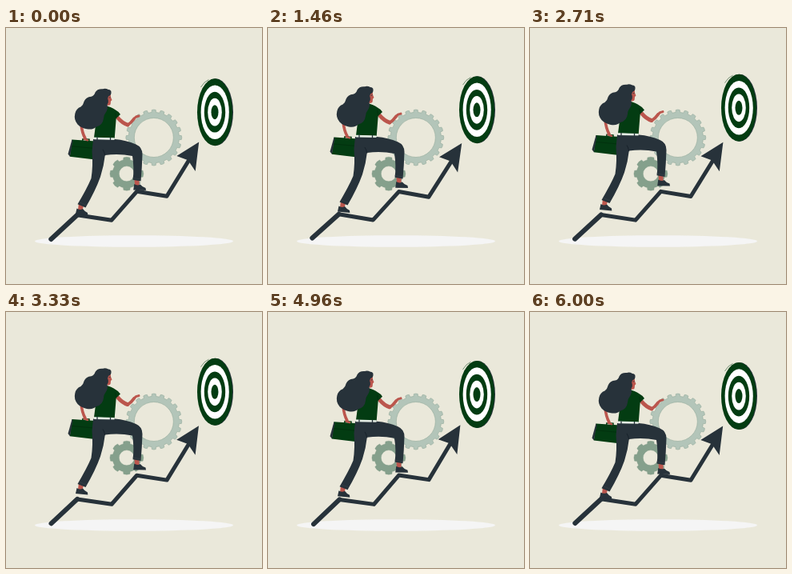
Recreate the animation shown at these times as an HTML page. Size 320 px wide and 320 px high, loop 6040 ms.

```html
<!DOCTYPE html>
<html lang="en">
<head>
<meta charset="utf-8">
<title>Climbing to the target</title>
<style>
  html, body { margin: 0; width: 100%; height: 100%; overflow: hidden; background: #eae8da; }
  svg { display: block; width: 100vw; height: 100vh; }
  .dark { fill: #27323a; }
  .green { fill: #033c12; }
  .skin { fill: #bb564d; }
  .limb { fill: none; stroke: #bb564d; stroke-linecap: round; stroke-linejoin: round; }
  .line { fill: none; stroke: #27323a; stroke-linejoin: round; stroke-linecap: round; }
</style>
</head>
<body>
<svg viewBox="0 0 320 320">
  <ellipse cx="160" cy="266.5" rx="124" ry="7.3" fill="#f5f5f5"/>

  <path id="bigGear" fill="#b3c5b9" stroke="#93a99b" stroke-width=".6" fill-rule="evenodd"/>
  <path id="smallGear" fill="#85a08c" stroke="#7b9783" stroke-width=".4" fill-rule="evenodd"/>

  <g id="target">
    <ellipse cx="262" cy="105.2" rx="22" ry="42" class="dark"/>
    <ellipse cx="261" cy="105.2" rx="22" ry="42" class="green"/>
    <path d="M243.500 74Q247.500 67 253.500 64.500" fill="none" stroke="#033c12" stroke-width=".5"/>
    <ellipse cx="261.2" cy="105.2" rx="17.6" ry="33.8" fill="#fff"/>
    <ellipse cx="261" cy="105.2" rx="13.2" ry="25.4" class="green"/>
    <ellipse cx="261" cy="105.2" rx="8.8" ry="17.4" fill="#fff"/>
    <ellipse cx="261" cy="105.2" rx="4.5" ry="9" class="green"/>
  </g>

  <g id="arrow">
    <path class="line" stroke-width="5" d="M89 233.700L132 240.200L163.500 204.300L201 210.300L230 163"/>
    <path class="line" stroke-width="6" d="M56.300 264L89 233.700"/>
    <path class="dark" d="M241.200 142.500L213.300 160L227.500 165.200L236.700 179Z"/>
  </g>

  <g id="woman">
    <!-- far arm and briefcase -->
    <path class="limb" stroke-width="3.600" d="M94 120Q95 131 99 138"/>
    <path d="M95.500 141.500L96 138.800L104 139.300L104 142" fill="none" stroke="#033c12" stroke-width="1.500"/>
    <path class="green" d="M82.500 139.500L112 141.500L109 164.200L79.800 160.700Z"/>
    <path class="dark" d="M82.500 139.300L83.500 141.500L80 160.700L77.500 157.500Z"/>
    <path d="M82 147.800L109 150.300" stroke="#022b0d" stroke-width=".6"/>
    <path class="limb" stroke-width="2.400" d="M97.500 138.500L102 140.300"/>

    <!-- feet -->
    <path class="skin" d="M91 219L97 222L95.500 228L90 227Z"/>
    <path class="skin" d="M160.500 188L166.500 188L166.500 197L161 198Z"/>
    <path class="dark" d="M88.500 225.500Q92 228 96 226Q98 229 102 231L102.300 234L87 232.300Z"/>
    <path class="dark" d="M160.300 195Q164 197.500 167.800 195.500Q170 198.500 174.500 200L175 203L159.200 202.600Z"/>

    <!-- trousers -->
    <path class="dark" d="M109 139L136 139Q150 140 162.500 145.500Q170.500 149 170.500 158Q170 175 168.500 191.500L158.500 189.700Q160.500 176 158 160Q141 156.500 123.800 159Q122.500 172 118 186Q112 203 99.500 224.500L89.500 220.300Q101 201 106.500 188Q109 172 107.500 154Z"/>
    <path d="M121 152Q123 155 123.800 159.500" fill="none" stroke="#17212a" stroke-width="1"/>
    <path d="M91 217.500L101 221.500M158.500 187.300L168.800 189" stroke="#3b464e" stroke-width=".5"/>

    <!-- near arm, shirt and belt -->
    <path class="limb" stroke-width="4.800" d="M139.500 112Q145.500 119 152 121"/>
    <path class="limb" stroke-width="3.800" d="M152 121.300Q156 119 160 113.500"/>
    <path class="limb" stroke-width="3" d="M160 113.500L162.500 111L166 110"/>
    <path class="green" d="M124 97Q132 98.500 137 102.500Q141 104.500 143 108L137.700 113L135.700 138L110 136.800L113 114Z"/>
    <path d="M137.700 112.500L136.500 106" stroke="#022b0d" stroke-width=".6"/>
    <path d="M110 138L135.500 138.600" stroke="#e3ebe3" stroke-width="2.600"/>
    <path d="M114 136.500V140M130.500 137V140.500" stroke="#27323a" stroke-width="1.300"/>

    <!-- head -->
    <path class="skin" d="M124 82L130.500 82L131.200 87L132.500 90L131 91.500L130.600 95.500Q129 97.500 126 96.500L126 101L121 100Z"/>
    <path class="dark" d="M131.500 80Q132 84 128 85.500Q126.500 88 127.800 90.500Q128.500 93 126.500 96Q128 101 124.500 106Q122 109 122 113Q121 121.500 113 123.500Q109 127.500 101 126.300Q94 125.300 89.500 120.500Q84.500 114.500 86.300 107Q87.700 100.500 93.500 98.500Q96.800 96 97.700 91.500Q100 86.300 106.500 85.700Q110.500 84.500 111.500 80.500Q114 75.700 121 76.200Q124 74.800 128 77Q131.500 77.300 131.500 80Z"/>
    <path d="M128.600 87.200L130.600 86.800" stroke="#27323a" stroke-width=".8"/>
  </g>
</svg>
<script>
  const LOOP = 6040;
  const $ = id => document.getElementById(id);

  function ring(cx, cy, r) {
    return `M${cx - r} ${cy}a${r} ${r} 0 1 0 ${2 * r} 0a${r} ${r} 0 1 0 ${-2 * r} 0Z`;
  }

  // Corner offsets are fractions of one tooth pitch.
  function gear(cx, cy, root, tip, hole, teeth, width) {
    const pitch = 2 * Math.PI / teeth;
    const pts = [];
    for (let i = 0; i < teeth; i++) {
      for (const [f, r] of [[-width, root], [-width * .8, tip], [0, tip + .4],
                            [width * .8, tip], [width, root], [.5, root]]) {
        const a = (i + f) * pitch - Math.PI / 2;
        pts.push((cx + r * Math.cos(a)).toFixed(2) + ' ' + (cy + r * Math.sin(a)).toFixed(2));
      }
    }
    return 'M' + pts.join('L') + 'Z' + ring(cx, cy, hole);
  }

  $('bigGear').setAttribute('d', gear(184.8, 137, 31.6, 34.6, 24.5, 20, .28));
  $('smallGear').setAttribute('d', gear(150.9, 182.2, 17.8, 20.6, 9.6, 8, .31));

  // Linear up and down: 0 at the start, 1 halfway, 0 at the end.
  const triangle = p => 1 - Math.abs(1 - 2 * (p % 1));

  function draw(now) {
    const p = now % LOOP / LOOP;
    const rise = `translate(0 ${-6 * triangle(p)})`;
    const tilt = 2 * triangle(p + .25) - 1;
    $('target').setAttribute('transform', rise);
    $('woman').setAttribute('transform', rise);
    $('arrow').setAttribute('transform', `rotate(${tilt} 147 205)`);
  }

  const start = performance.now();
  function tick() {
    draw(performance.now() - start);
    requestAnimationFrame(tick);
  }
  tick();
</script>
</body>
</html>
```
